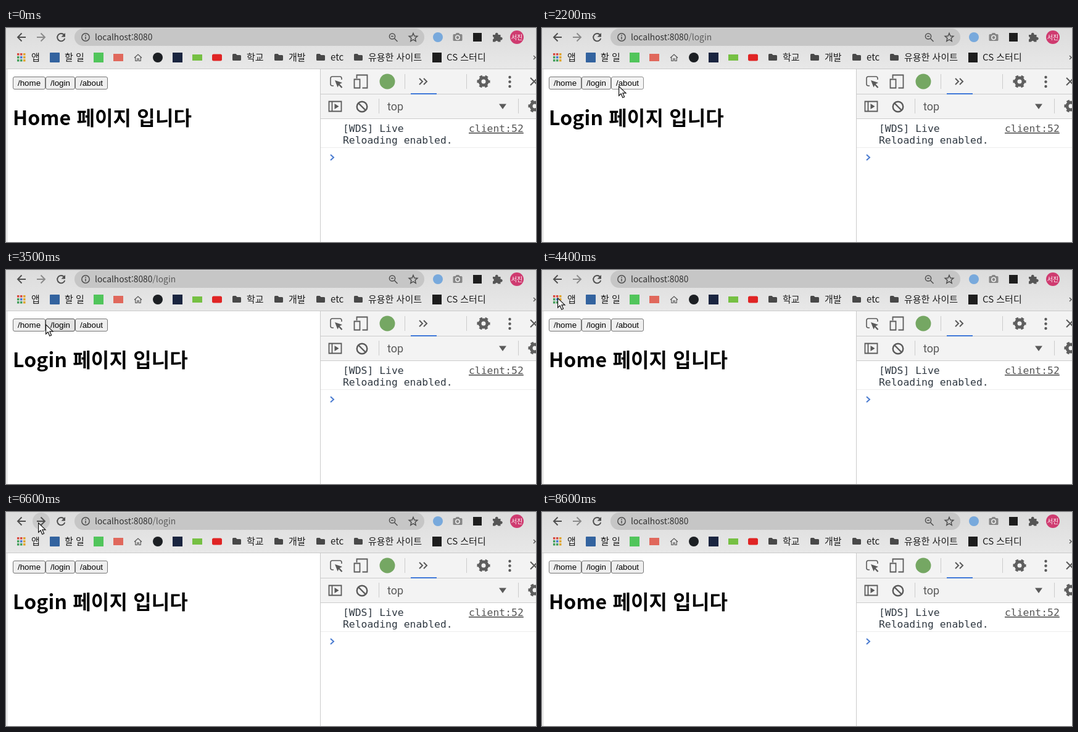
An HTML page for the animation above (9000 ms loop, 859 by 348 pixels).

```html
<!DOCTYPE html>
<html lang="ko">
<head>
<meta charset="utf-8">
<title>Browser navigation</title>
<style>
html, body { margin: 0; width: 100%; height: 100%; overflow: hidden; background: #fff; }
svg { display: block; width: 859px; height: 348px; }
text { font-family: "Noto Sans CJK KR", "Noto Sans CJK", "Noto Sans", sans-serif; white-space: pre; }
.bar { font-size: 15px; fill: #1c1c1c; }
.line { fill: none; stroke: #5a5a5a; stroke-width: 2; }
.dark { fill: #5a5a5a; }
.btn text { font: 13.333px "Liberation Sans", Arial, sans-serif; fill: #000; }
.mono { font: 16.4px "DejaVu Sans Mono", monospace; fill: #303942; }
</style>
</head>
<body>
<svg viewBox="0 0 859 348">
  <defs>
    <linearGradient id="chrome" x2="0" y2="1">
      <stop stop-color="#dcdcdc"/><stop offset="1" stop-color="#e8e8e8"/>
    </linearGradient>
    <path id="arrow" d="M7 0H-6M.5-6.500L-6 0 .5 6.500" fill="none" stroke-width="1.900"/>
    <path id="folder" d="M-7-4.500q0-1.500 1.500-1.500h4l2 2h5q1.500 0 1.500 1.500v6q0 1.500-1.500 1.500h-11q-1.500 0-1.500-1.500z" fill="#484848"/>
    <g id="gear">
      <circle r="6" fill="none" stroke="#5f5f5f" stroke-width="5"/>
      <circle r="8.900" fill="none" stroke="#5f5f5f" stroke-width="3.400" stroke-dasharray="4.660" stroke-dashoffset="2.330"/>
    </g>
  </defs>

  <!-- browser toolbar -->
  <rect width="859" height="67" fill="url(#chrome)"/>
  <rect y="66" width="859" height="1" fill="#c9c9c9"/>
  <rect y="67" width="3" height="281" fill="#ebebeb"/>
  <circle id="backHover" cx="25" cy="15" r="14" fill="#000" opacity=".09"/>
  <circle id="nextHover" cx="57" cy="15" r="14" fill="#000" opacity=".09"/>
  <use href="#arrow" x="25" y="15" stroke="#4e4e4e"/>
  <use id="next" href="#arrow" transform="translate(57 15) scale(-1 1)"/>
  <path d="M94 11a6.200 6.200 0 1 0 1.300 6" fill="none" stroke="#4e4e4e" stroke-width="1.900"/>
  <path d="M96 8v6.500h-6.500z" fill="#4e4e4e"/>
  <rect x="111" y="1" width="567" height="28" rx="14" fill="#c6c6c6"/>
  <g fill="none" stroke="#505050" stroke-width="1.500">
    <circle cx="129" cy="15" r="6.200"/>
    <path d="M129 14v4.500M129 11v1.700"/>
    <circle cx="626" cy="13.500" r="4.600"/>
    <path d="M629.500 17l5 5M624 13.500h4"/>
    <path d="M660 8.500l1.900 4.500 4.900.4-3.700 3.200 1.100 4.800-4.200-2.500-4.200 2.500 1.100-4.800-3.700-3.200 4.900-.4z"/>
  </g>
  <text x="144" y="20" font-size="13.800" fill="#303030">localhost:8080<tspan id="path" fill="#5c5c5c"></tspan></text>
  <circle cx="700" cy="15" r="8" fill="#78a9dc"/>
  <path d="M726 10h2.500l1.500-2h4l1.500 2h2.500q1.500 0 1.500 1.500v8q0 1.500-1.500 1.500h-12q-1.500 0-1.500-1.500v-8q0-1.500 1.500-1.500z" fill="#868686"/>
  <circle cx="732" cy="15.500" r="3.200" fill="none" stroke="#eee" stroke-width="1.500"/>
  <rect x="757" y="8" width="14" height="14" fill="#1d1d1d"/>
  <path d="M789 11h4a2.400 2.400 0 1 1 4.500 0h4v4a2.400 2.400 0 1 1 0 4.500v3h-4a2.300 2.300 0 0 0-4.500 0h-4v-4a2.300 2.300 0 0 0 0-4.500z" fill="#555"/>
  <circle cx="828" cy="15" r="11" fill="#cf3b70"/>
  <text x="828" y="18.500" font-size="10" text-anchor="middle" fill="#fff">서진</text>

  <!-- bookmarks -->
  <g id="apps"></g>
  <rect x="71" y="40" width="16" height="16" rx="1" fill="#33639f"/>
  <rect x="142" y="40" width="16" height="16" fill="#51c55b"/>
  <rect x="174" y="42" width="16" height="12" fill="#e0685c"/>
  <path d="M208 48.500l6-5.500 6 5.500M209.800 47.500v6h3v-3.500h2.400v3.500h3v-6" fill="none" stroke="#555" stroke-width="1.200"/>
  <circle cx="246" cy="48" r="8" fill="#1c1f23"/>
  <rect x="270" y="40" width="16" height="16" fill="#1a2540"/>
  <rect x="302" y="43" width="16" height="10" fill="#76c043"/>
  <rect x="334" y="42.500" width="16" height="11" rx="2.500" fill="#e02424"/>
  <use href="#folder" x="374" y="48"/>
  <use href="#folder" x="442" y="48"/>
  <use href="#folder" x="510" y="48"/>
  <use href="#folder" x="571" y="48"/>
  <rect x="691" y="40" width="15" height="16" fill="#1d1d1d"/>
  <g class="bar">
    <text x="41" y="53">앱</text>
    <text x="95" y="53">할 일</text>
    <text x="390" y="53">학교</text>
    <text x="458" y="53">개발</text>
    <text x="526" y="53">etc</text>
    <text x="587" y="53">유용한 사이트</text>
    <text x="714" y="53">CS 스터디</text>
  </g>
  <path d="M855 45l3 3-3 3" fill="none" stroke="#505050" stroke-width="1.400"/>

  <!-- page -->
  <g id="buttons" class="btn"></g>
  <text id="title" x="11" y="158" font-size="32" font-weight="700" letter-spacing=".15"></text>

  <!-- developer tools -->
  <rect x="509" y="67" width="350" height="81" fill="#f3f3f3"/>
  <path d="M509.500 67v281M510 107.500h349M510 147.500h349" stroke="#cbcbcb"/>
  <path d="M646.500 75v24M746.500 75v24M604.500 115v24M830.500 115v24" stroke="#ccc"/>
  <path d="M510 194.500h349" stroke="#ececec"/>
  <rect x="656" y="106" width="42" height="2" fill="#4079d8"/>
  <g class="line">
    <path d="M531 94h-2q-3 0-3-3V82q0-3 3-3h12q3 0 3 3v2" stroke-width="1.600"/>
    <path d="M539 91l5.500 6" stroke-width="2.400"/>
    <path d="M568.500 82v-5.500h17v21h-8M564.500 83.500h9v14h-9z" stroke-width="1.800"/>
    <path d="M670 82l5 5-5 5M677 82l5 5-5 5"/>
    <path d="M850 81l12 12M850 93l12-12"/>
    <path d="M523.500 119.500h20v16h-20zM528.500 119.500v16" stroke-width="1.800"/>
    <circle cx="577" cy="128" r="8.300" stroke-width="2.400"/>
    <path d="M571 122l12 12" stroke-width="2.400"/>
  </g>
  <g class="dark">
    <path d="M533 85l12 4-5 2.500-2.500 5z"/>
    <path d="M532.500 123l7 4.500-7 4.500z"/>
    <circle cx="816.500" cy="80" r="2.200"/>
    <circle cx="816.500" cy="87.500" r="2.200"/>
    <circle cx="816.500" cy="95" r="2.200"/>
    <path d="M799 123.500h12l-6 8.500z"/>
  </g>
  <circle cx="618" cy="87" r="12.500" fill="#75a763"/>
  <use href="#gear" x="774" y="87"/>
  <use href="#gear" x="857" y="127"/>
  <text x="618" y="134" style="font:18px Roboto,sans-serif" fill="#5a5a5a">top</text>
  <text class="mono" x="546" y="169">[WDS] Live</text>
  <text class="mono" x="546" y="188">Reloading enabled.</text>
  <text class="mono" x="750" y="169" style="fill:#545454" text-decoration="underline">client:52</text>
  <path d="M526 206l5 4.500-5 4.500" fill="none" stroke="#4a7bd0" stroke-width="2"/>

  <path id="cursor" d="M.6.800V16.200l3.500-3.300 2.700 6.300 2.800-1.200-2.700-6.100H12z" fill="#fff" stroke="#111" stroke-width="1.200"/>
</svg>
<script>
const LOOP = 9000, TICK = 100;
const $ = id => document.getElementById(id);
const between = (t, a, b) => t >= a && t < b;
const lastOf = (list, t) => list.filter(e => e[0] <= t).pop()[1];

const pages = [[0, 'Home'], [1500, 'Login'], [2300, 'About'], [3000, 'Login'], [3800, 'Home'], [4900, 'Login'],
  [5400, 'About'], [5900, 'Login'], [6900, 'About'], [7100, 'Login'], [7500, 'Home']];
// The address trails the heading on two of the clicks.
const lag = { 3000: 300, 3800: 200 };
const urls = pages.map(([t, p]) => [t + (lag[t] || 0), p === 'Home' ? '' : '/' + p.toLowerCase()]);

// time, x, y of the pointer tip
const track = [[700, 186, 291], [1200, 88, 90], [1800, 88, 90], [2200, 124, 94], [2400, 124, 94], [2700, 88, 90],
  [3200, 88, 90], [3500, 64, 88], [3600, 44, 88], [4100, 44, 88], [4400, 25, 45], [4700, 24, 16], [6100, 24, 16],
  [6200, 44, 17], [6400, 44, 17], [6600, 52, 17], [8100, 52, 17], [8400, 40, 0], [8600, 40, 0]];
const presses = [[2200, 2300], [2900, 3300], [3700, 3800]];

function pointer(t) {
  const i = track.findIndex(p => p[0] > t);
  if (i < 1) return null;
  const [a, b] = [track[i - 1], track[i]];
  const k = (t - a[0]) / (b[0] - a[0]);
  return [a[1] + (b[1] - a[1]) * k, a[2] + (b[2] - a[2]) * k];
}

const dots = ['#d9493f', '#d9493f', '#e0a52c', '#43a05a', '#4479d4', '#e0a52c', '#43a05a', '#43a05a', '#e0a52c'];
$('apps').innerHTML = dots.map((c, i) =>
  `<rect x="${18 + i % 3 * 5}" y="${41 + (i / 3 | 0) * 5}" width="3.500" height="3.500" fill="${c}"/>`).join('');

const buttons = [['/home', 11, 53], ['/login', 64, 48], ['/about', 112, 53]];
$('buttons').innerHTML = buttons.map(([label, x, w]) =>
  `<rect x="${x + .5}" y="79.500" width="${w - 1}" height="20" rx="2.500"/><text x="${x + 8}" y="94">${label}</text>`).join('');
const boxes = $('buttons').querySelectorAll('rect');

function draw(now) {
  const t = Math.floor(now % LOOP / TICK) * TICK;
  const tip = pointer(t);
  const down = presses.some(p => between(t, ...p));
  $('title').textContent = lastOf(pages, t) + ' 페이지 입니다';
  $('path').textContent = lastOf(urls, t);
  buttons.forEach(([, x, w], i) => {
    const over = tip && between(tip[0], x, x + w) && between(tip[1], 79, 100);
    boxes[i].setAttribute('fill', over ? (down ? '#f5f5f5' : '#e3e3e3') : '#efefef');
    boxes[i].setAttribute('stroke', over ? (down ? '#8d8d8d' : '#4f4f4f') : '#767676');
  });
  $('next').setAttribute('stroke', between(t, 4900, 7500) ? '#4e4e4e' : '#8a8a8a');
  $('backHover').style.display = between(t, 4900, 6500) ? '' : 'none';
  $('nextHover').style.display = between(t, 6500, 8000) ? '' : 'none';
  $('cursor').style.display = tip ? '' : 'none';
  if (tip) $('cursor').setAttribute('transform', `translate(${tip})`);
}

const start = performance.now();
(function loop() {
  draw(performance.now() - start);
  requestAnimationFrame(loop);
})();
</script>
</body>
</html>
```
